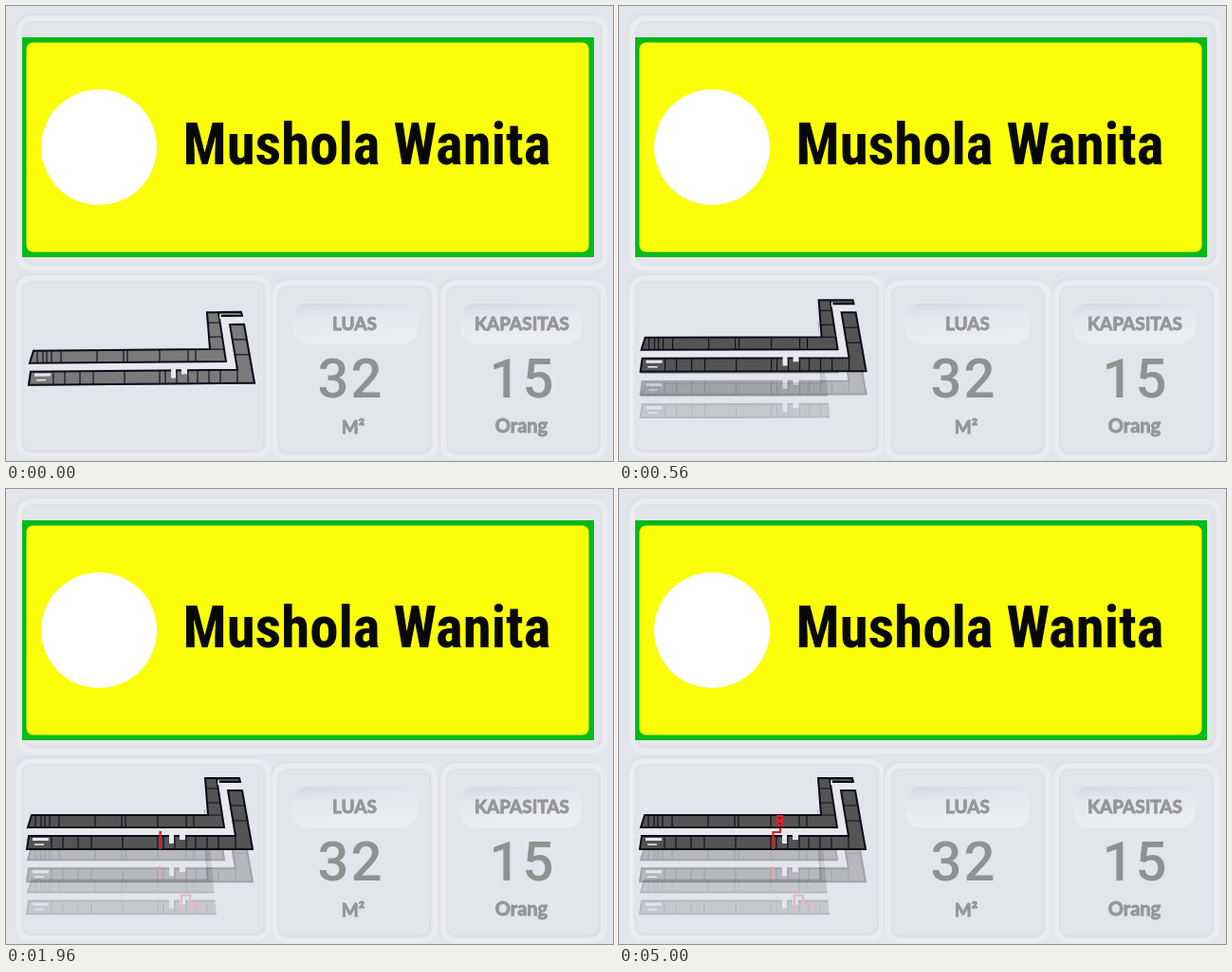
An HTML page that plays this animation: 640 by 480 pixels, repeating every 5.12 s.

```html
<!DOCTYPE html>
<html lang="id">
<head>
<meta charset="utf-8">
<title>Mushola Wanita</title>
<style>
  html, body { margin: 0; width: 100%; height: 100%; overflow: hidden; background: #e2e5ea; }
  svg { display: block; width: 640px; height: 480px; }
  text { text-anchor: middle; }
  #title { font-family: "Roboto Condensed", Roboto, sans-serif; font-weight: 600; font-stretch: 75%; fill: #080808; }
  .number { font: 500 58px Roboto, sans-serif; letter-spacing: 2px; fill: #909291; }
  .label { font: 700 19px Lato, sans-serif; fill: #989a9b; stroke: #8c8e8f; stroke-width: .8; }
  .walls { fill: none; stroke: #10111d; stroke-width: 1.2; }
  .outline { fill: none; stroke: #0b0c18; stroke-width: 2; }
  .route { fill: none; stroke: #e0202a; stroke-width: 2.2; }
</style>
</head>
<body>
<svg viewBox="0 0 640 480">
  <defs>
    <filter id="soft"><feGaussianBlur stdDeviation="1.2"/></filter>
    <linearGradient id="pillFill" x2="0.25" y2="1">
      <stop stop-color="#d6d9df"/><stop offset=".35" stop-color="#e3e6eb"/><stop offset="1" stop-color="#eceef2"/>
    </linearGradient>
    <g id="floor">
      <path fill="#e6e8ed" d="M26 343H210V304H248L260 380H22Z"/>
      <path id="rooms"/>
      <path id="walls" class="walls"/>
      <path id="outline" class="outline"/>
      <path fill="#e6e8ed" d="M172 364H177V374H172Z M183 364H189V370H183Z M28 368H45V371H28Z"/>
      <path fill="none" stroke="#f0f1f5" stroke-width="1.500" d="M30 375H40M224 307V312M238 313H245"/>
    </g>
    <clipPath id="wing"><path d="M0 300H214L222 381H0Z"/></clipPath>
  </defs>

  <g id="panels"></g>
  <path fill="#06b91c" d="M17 33H620V265H17Z"/>
  <rect x="21.500" y="38.500" width="593" height="221" rx="7" fill="#fbfe08"/>
  <circle cx="98" cy="149" r="61" fill="#fff"/>
  <text id="title" x="380.500">Mushola Wanita</text>

  <text class="label" x="367.500" y="342">LUAS</text>
  <text class="label" x="544" y="342">KAPASITAS</text>
  <text class="number" x="363.500" y="413">32</text>
  <text class="number" x="544.500" y="413">15</text>
  <text class="label" x="366" y="451">M²</text>
  <text class="label" x="543.500" y="450" style="font-size:20px">Orang</text>

  <g class="level" opacity=".2">
    <use href="#floor" clip-path="url(#wing)"/>
    <path id="lowRoute" class="route" d="M185 379V360H194V369H204V378"/>
  </g>
  <g class="level" opacity=".3">
    <use href="#floor"/>
    <path id="midRoute" class="route" d="M162 378V364"/>
  </g>
  <g class="level">
    <use href="#floor"/>
    <path id="topRoute" class="route" pathLength="1" stroke-dasharray="1 2" d="M162.500 380V362H170V358"/>
    <g id="goal">
      <path fill="#e0202a" d="M166 344H173V356H166Z"/>
      <path stroke="#5a2026" stroke-width="1.500" d="M168 347H171M168 353H171"/>
    </g>
  </g>
</svg>
<script>
const LOOP = 5120, SPREAD = 1120;
const $ = id => document.getElementById(id);
const clamp = v => Math.min(1, Math.max(0, v));
const ramp = (t, from, to) => clamp((t - from) / (to - from));
const lerp = (a, b, k) => a + (b - a) * k;

const box = (x, y, w, h, r, style) =>
  `<rect x="${x}" y="${y}" width="${w}" height="${h}" rx="${r}" ${style}/>`;
const panel = (x, y, w, h) =>
  box(x, y, w, h, 14, 'fill="none" stroke="#d9dce2" stroke-width="4" filter="url(#soft)"') +
  box(x + 2, y + 3, w, h, 13, 'fill="none" stroke="#eaecf0" stroke-width="6" filter="url(#soft)"') +
  box(x + 6, y + 7, w - 9, h - 9, 10, 'fill="#e2e5ea" stroke="#dcdfe4"');
const pill = (x, w) =>
  box(x, 316, w, 41, 16, 'fill="#eceef2" filter="url(#soft)"') +
  box(x, 314, w, 39, 15, 'fill="url(#pillFill)"');

$('panels').innerHTML = panel(12, 10, 618, 263) + panel(11, 284, 264, 187) +
  panel(281, 289, 169, 184) + panel(459, 289, 169, 184) + pill(303, 130) + pill(480, 127);

// Rooms lie on both sides of an L-shaped corridor.
const rooms = 'M27 344H213L210 305H222L230 357H23Z M24 366H242L234 318H249L260 380H22Z M222 305H246L247 309H223Z';
const ticks = (xs, y, h) => xs.map(x => `M${x} ${y}v${h}`).join('');
$('rooms').setAttribute('d', rooms);
$('outline').setAttribute('d', rooms);
$('walls').setAttribute('d',
  ticks([31, 37, 41, 46, 56, 94, 122, 126, 160, 190, 198], 344, 13) +
  ticks([48, 60, 76, 90, 123, 160, 166, 178, 190, 200, 212, 224, 242], 366, 14) +
  'M211 316H224M212 331H226M213 344H228M237 334H252M239 350H255');

// Size the heading so that it fills its line.
const title = $('title');
title.setAttribute('font-size', 60);
const size = 60 * 388 / title.getComputedTextLength();
title.setAttribute('font-size', size);
title.setAttribute('y', 145 + size * 0.355);

const levels = [...document.querySelectorAll('.level')].reverse();

function draw(t) {
  const open = Math.sin(ramp(t, 0, SPREAD) * Math.PI / 2);
  const shut = 1 - open;
  const grey = lerp(122, 84, clamp(open * 2));
  levels.forEach((level, i) => {
    const y = lerp(20, 34.3 * i, open);
    level.setAttribute('transform', `translate(${2 * shut} ${y}) skewY(${-0.5 * shut})`);
    level.setAttribute('fill', `rgb(${grey},${grey},${grey})`);
  });
  $('lowRoute').style.opacity = ramp(t, 560, 960);
  $('midRoute').style.opacity = ramp(t, 840, 1160);
  const drawn = ramp(t, 1240, 2320);
  $('topRoute').style.opacity = drawn > 0 ? 1 : 0;
  $('topRoute').setAttribute('stroke-dashoffset', 1 - drawn);
  $('goal').style.opacity = ramp(t, 2880, 3440);
}

const start = performance.now();
(function tick() {
  draw((performance.now() - start) % LOOP);
  requestAnimationFrame(tick);
})();
</script>
</body>
</html>
```
